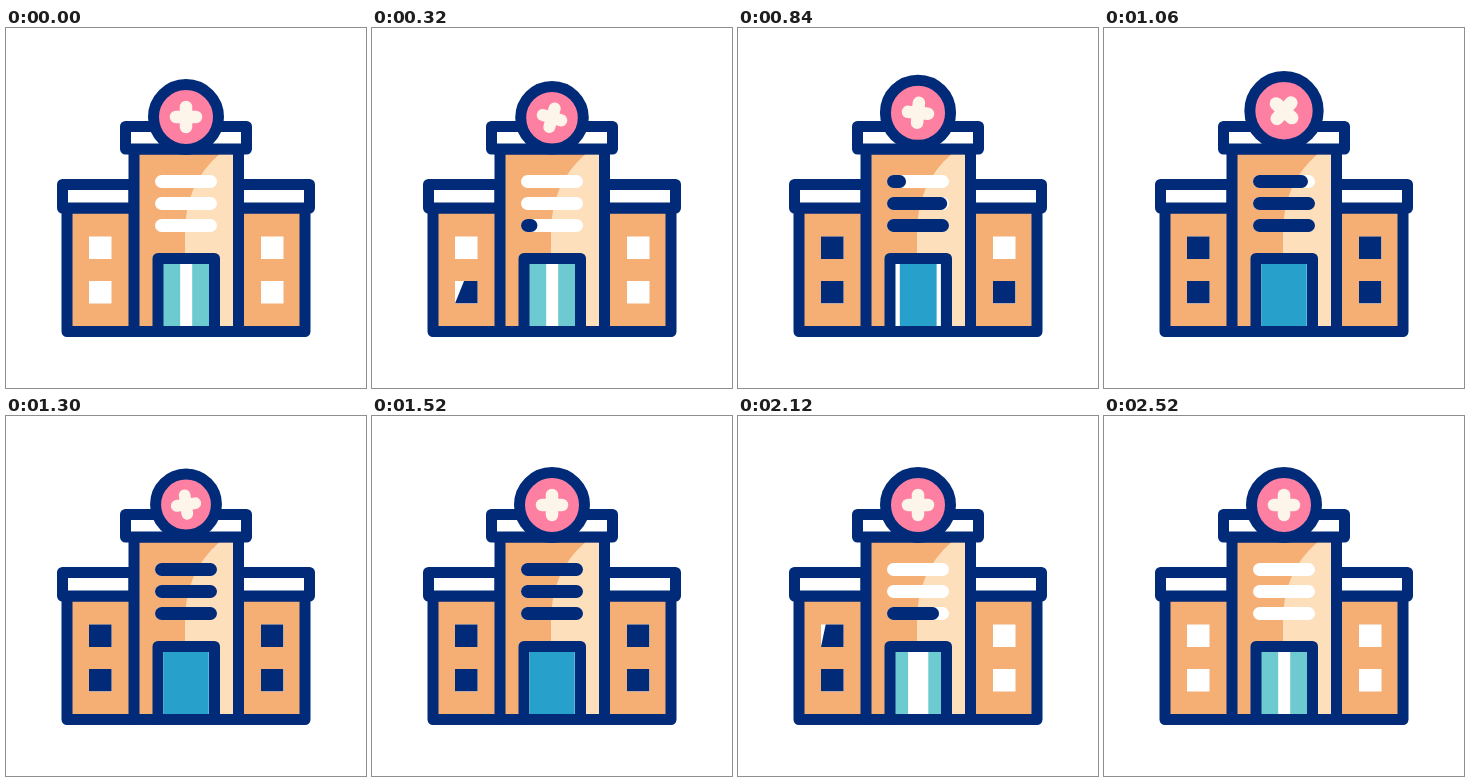
Recreate the animation shown at these times as an HTML page with a canvas. Size 360 by 360 pixels, loop 2820 ms.

```html
<!DOCTYPE html>
<html lang="en">
<head>
<meta charset="utf-8">
<title>Hospital</title>
<style>
html, body { margin: 0; width: 100%; height: 100%; overflow: hidden; background: #fff; }
canvas { display: block; width: 360px; height: 360px; }
</style>
</head>
<body>
<canvas id="stage" width="360" height="360"></canvas>
<script>
const ctx = document.getElementById('stage').getContext('2d');
const LOOP = 2820, MIRROR = 2660;
const NAVY = '#012b78', PEACH = '#f5ae74', LIGHT = '#fddfbc', PINK = '#fd7fa2',
      CREAM = '#fdf5ea', TEAL = '#6ccad0', BLUE = '#28a0cc', WHITE = '#fff';

const ramp = (t, from, to) => Math.min(1, Math.max(0, (t - from) / (to - from)));
const smooth = x => x * x * (3 - 2 * x);
const mix = (a, b, x) => a + (b - a) * x;

// Badge bounce: time, radius, centre y
const BOUNCE = [[200, 32.5, 89], [600, 27, 92.3], [980, 35, 81.5], [1280, 30.3, 88.5], [1420, 32.5, 89]];

// Windows: x, y, start, end, hinge on the right
const WINDOWS = [
  [83, 253, 200, 360, false], [83, 208.5, 400, 560, false],
  [255, 253, 640, 800, true], [255, 208.5, 880, 1040, true]
];

function fillRect(x1, y1, x2, y2, color) {
  ctx.fillStyle = color;
  ctx.fillRect(x1, y1, x2 - x1, y2 - y1);
}

function box(x1, y1, x2, y2, fill) {
  ctx.beginPath();
  ctx.rect(x1, y1, x2 - x1, y2 - y1);
  ctx.fillStyle = fill;
  ctx.fill();
  ctx.strokeStyle = NAVY;
  ctx.lineWidth = 11;
  ctx.stroke();
}

function line(x1, y1, x2, y2, color, width) {
  ctx.beginPath();
  ctx.moveTo(x1, y1);
  ctx.lineTo(x2, y2);
  ctx.strokeStyle = color;
  ctx.lineWidth = width;
  ctx.stroke();
}

function drawWindow(t, [x, y, start, end, right]) {
  const size = 22.5, p = ramp(t, start, end);
  fillRect(x, y, x + size, y + size, WHITE);
  if (!p) return;
  ctx.save();
  ctx.beginPath();
  ctx.rect(x, y, size, size);
  ctx.clip();
  ctx.translate(right ? x + size : x, y + size);
  ctx.scale(right ? -1 : 1, 1);
  ctx.beginPath();
  ctx.moveTo(0, 0);
  ctx.arc(0, 0, 40, 0, -p * Math.PI / 2, true);
  ctx.fillStyle = NAVY;
  ctx.fill();
  ctx.restore();
}

function drawTower() {
  box(128, 121, 232.5, 303.5, PEACH);
  ctx.beginPath();
  ctx.moveTo(213, 126.5);
  ctx.quadraticCurveTo(179, 156, 179, 205);
  ctx.lineTo(179, 298);
  ctx.lineTo(227, 298);
  ctx.lineTo(227, 126.5);
  ctx.fillStyle = LIGHT;
  ctx.fill();
  box(119.5, 98.5, 240.5, 121, WHITE);
}

function drawDoor(t) {
  const gap = mix(6, 22.5, ramp(t, 440, 840));
  const rest = 1 - ramp(t, 560, 1050);
  const inside = 22.5 * (1 - rest * rest);
  box(152, 230.5, 208.5, 303.5, TEAL);
  fillRect(180.2 - gap, 236, 180.2 + gap, 298, WHITE);
  fillRect(180.2 - inside, 236, 180.2 + inside, 298, BLUE);
}

function drawBadge(t) {
  let i = 0;
  while (i < BOUNCE.length - 2 && t > BOUNCE[i + 1][0]) i++;
  const [t1, r1, y1] = BOUNCE[i], [t2, r2, y2] = BOUNCE[i + 1];
  const x = smooth(ramp(t, t1, t2)), r = mix(r1, r2, x);
  const turn = t < 540 ? mix(0, 45, ramp(t, 200, 540)) : mix(45, 180, ramp(t, 540, 1350));
  ctx.save();
  ctx.translate(180, mix(y1, y2, x));
  ctx.beginPath();
  ctx.arc(0, 0, r, 0, 7);
  ctx.fillStyle = PINK;
  ctx.fill();
  ctx.strokeStyle = NAVY;
  ctx.lineWidth = 11;
  ctx.stroke();
  ctx.rotate(turn * Math.PI / 180);
  ctx.scale(r / 32.5, r / 32.5);
  line(-10, 0, 10, 0, CREAM, 12.5);
  line(0, -10, 0, 10, CREAM, 12.5);
  ctx.restore();
}

function draw(time) {
  const t = time % LOOP;
  const phase = Math.min(t, MIRROR - t);   // opens, then plays back
  fillRect(0, 0, 360, 360, WHITE);
  ctx.lineCap = ctx.lineJoin = 'round';

  box(61, 180, 299, 303.5, PEACH);
  box(56.5, 156.5, 128, 180, WHITE);
  box(232.5, 156.5, 303.5, 180, WHITE);
  drawTower();
  WINDOWS.forEach(w => drawWindow(phase, w));

  for (let i = 0; i < 3; i++) {
    const y = 197.5 - 22 * i, start = 300 + 252 * i;
    const p = ramp(phase, start, start + 300);
    line(155.5, y, 204.5, y, WHITE, 13);
    if (p) line(155.5, y, mix(155.5, 204.5, p), y, NAVY, 13);
  }

  drawDoor(phase);
  drawBadge(t);
}

const begin = performance.now();
function tick() {
  draw(performance.now() - begin);
  requestAnimationFrame(tick);
}
tick();
</script>
</body>
</html>
```
